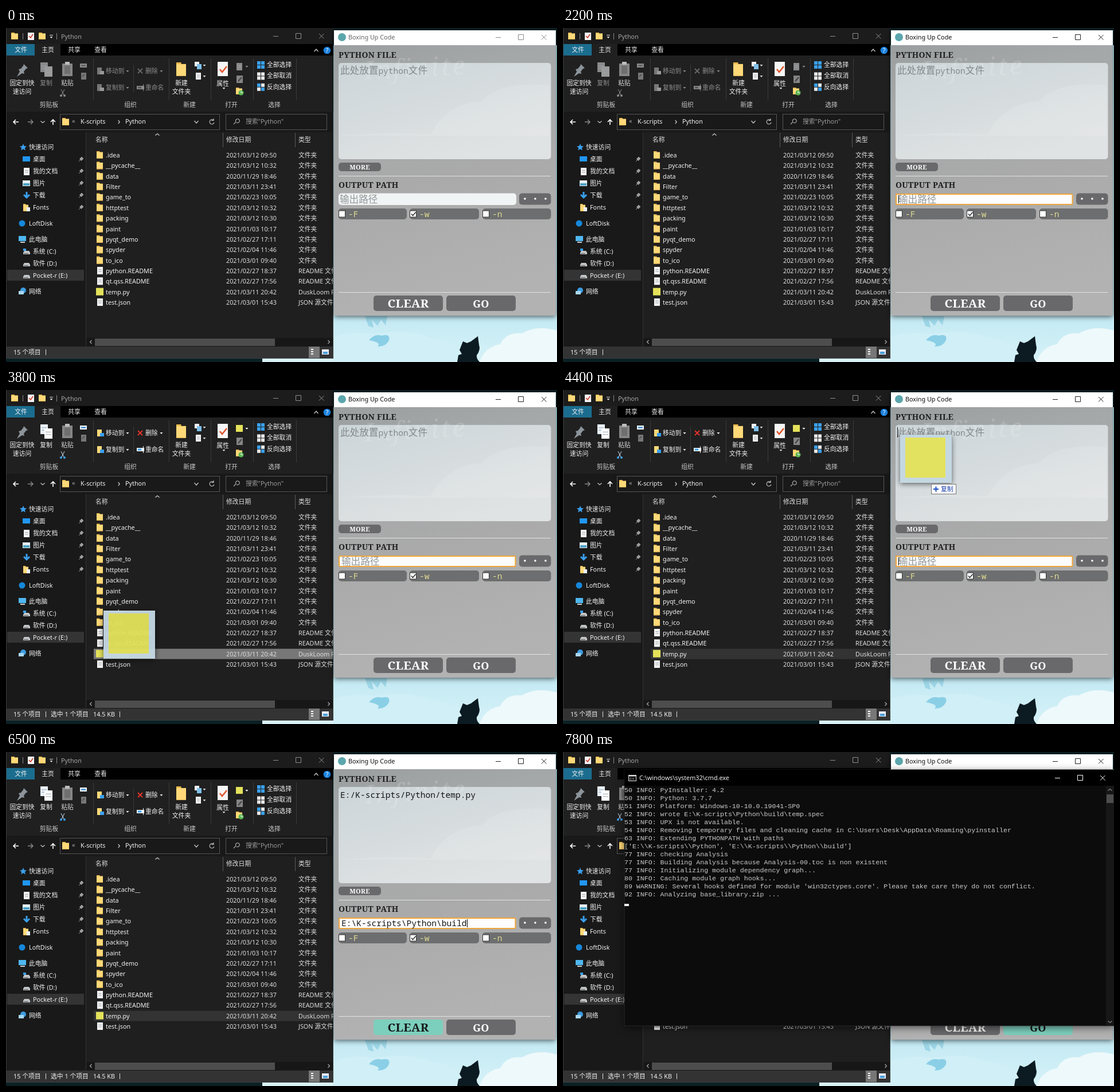
These frames come from a looping animation (961 px wide and 583 px high, 8 s). An HTML page:

```html
<!DOCTYPE html>
<html lang="zh-CN">
<head>
<meta charset="utf-8">
<title>Packager demo</title>
<style>
html, body { margin: 0; height: 100%; overflow: hidden; background: #0b2024; }
svg { display: block; width: 100vw; height: 100vh; }
text { font: 10.8px "Noto Sans", "Noto Sans CJK SC", sans-serif; white-space: pre; }
.mid { text-anchor: middle; }
.mono { font: 14.57px "Noto Sans Mono", "Noto Sans CJK SC", monospace; }
.cjk { font: 300 16.6px "Noto Sans CJK SC", sans-serif; }
.slab { font: 900 14px "Noto Serif", serif; letter-spacing: .3px; }
.term { font: 11.6px "Liberation Mono", monospace; }
.script { font: italic 300 44px "Noto Serif", serif; letter-spacing: 4px; }
.console { filter: drop-shadow(0 3px 7px #0008); }
.window { filter: drop-shadow(0 2px 5px #0009); }
</style>
</head>
<body>
<svg viewBox="0 0 961 583" preserveAspectRatio="none">
  <defs>
    <linearGradient id="sky" x2="0" y2="1"><stop stop-color="#a9dbe6"/><stop offset=".85" stop-color="#c3e9f3"/><stop offset="1" stop-color="#d6f2f8"/></linearGradient>
    <linearGradient id="panel" x2=".2" y2="1"><stop stop-color="#989c9d"/><stop offset=".25" stop-color="#a5a8a9"/><stop offset=".6" stop-color="#aaa"/><stop offset="1" stop-color="#b2b2b2"/></linearGradient>
    <linearGradient id="box" x2=".6" y2="1"><stop stop-color="#ccd5d8"/><stop offset="1" stop-color="#e0e3e4"/></linearGradient>
  </defs>
  <g id="scene"></g>
</svg>
<script>
const LOOP = 8000, STEP = 100;
const TEAL = '#7dcfbd', GREY = '#69696b', DIM = '#8c8c8c', BLUE = '#3aa0ee', LOGO = '#e4e25a';

const rect = (x, y, w, h, fill, more = '') =>
  `<rect x="${x}" y="${y}" width="${w}" height="${h}" fill="${fill}" ${more}/>`;
const round = (x, y, w, h, fill) => rect(x, y, w, h, fill, 'rx="5"');
const dot = (x, y, r, fill) => `<circle cx="${x}" cy="${y}" r="${r}" fill="${fill}"/>`;
const path = (d, stroke = '#ccc', width = 1, fill = 'none') =>
  `<path d="${d}" stroke="${stroke}" stroke-width="${width}" fill="${fill}"/>`;
const shape = (d, fill) => path(d, 'none', 0, fill);
const text = (x, y, s, fill = '#fff', cls = '', size = 0) =>
  `<text x="${x}" y="${y}" fill="${fill}" class="${cls}"${size ? ` style="font-size:${size}px"` : ''}>${s}</text>`;
const label = (x, y, s, fill = '#f2f2f2', cls = '') => text(x, y + 4, s, fill, cls);
const mid = (x, y, s, fill) => label(x, y, s, fill, 'mid');

const folder = (x, y, w = 11, h = 13) =>
  rect(x, y, w * .5, h, '#e8b64a') + rect(x, y + h * .12, w, h * .88, '#ffd978') + rect(x, y + h - 1, w, 1, '#e0b050');
const sheet = (x, y, w, h, fill = '#f4f4f4') =>
  rect(x, y, w, h, fill) + path(`M${x + 2} ${y + h * .35}h${w - 4}M${x + 2} ${y + h * .6}h${w - 4}`, '#9aa4ad');
const drop = (x, y, fill = '#ddd') => shape(`M${x - 2.5} ${y - 1}h5l-2.5 3z`, fill);
const chevron = (x, y, dx, dy, stroke = '#ccc') => dx
  ? path(`M${x - dx} ${y - 3}l${2 * dx} 3l${-2 * dx} 3`, stroke, 1.2)
  : path(`M${x - 3.5} ${y - dy}l3.5 ${2 * dy}l3.5 ${-2 * dy}`, stroke, 1.2);
const captionButtons = (xs, y, stroke) =>
  path(`M${xs[0] - 4} ${y + .5}h9M${xs[1] - 4.5} ${y - 4.5}h9v9h-9zM${xs[2] - 4} ${y - 4}l8.5 8.5m0 -8.5l-8.5 8.5`, stroke);

function wallpaper() {
  return rect(571, 30, 390, 553, 'url(#sky)') + rect(447, 576, 124, 7, '#d9f2f7') +
    shape('M571 583V540Q600 528 640 534Q700 524 740 540Q775 545 790 560V583z', '#d0eff7') +
    shape('M826 583Q835 556 862 552Q872 530 900 533Q925 518 961 528V583z', '#eef9fb') +
    shape('M626 503l6 17 9 3-3-14 10 11 6-11 8 10 3-16z', '#9dd6e6') +
    shape('M633 545q10-12 22-8q16-4 13 8q-6 12-20 11q8-7-15-11z', '#8acfe6') +
    shape('M787 583l2-12 6-2-4-7 6-15 7 3 7-3 12-9 2 15q3 9-4 18q-1 6 5 12z', '#0c1a22');
}

function ribbon(on) {
  const live = on ? '#f2f2f2' : DIM, paper = on ? '#eaf2fb' : '#8a8a8a';
  let s = rect(1, 0, 570, 28, '#1c1c1c') + rect(1, 28, 570, 20, '#000') + rect(1, 48, 570, 98, '#202020') +
    rect(1, 28, 49, 20, '#1b6d8f') + rect(50, 28, 45, 20, '#202020');
  s += folder(9, 8, 12, 12) + path('M29.5 9v11M88.5 9v11', '#888') + rect(38, 8, 11, 13, '#f4f4f4') +
    path('M40 14l3 3 4-6', '#d23b2a', 1.6) + folder(57, 8, 12, 12) + path('M76 12.5h6', '#ddd') + drop(79, 16) +
    label(96, 15, 'Python', '#a5a5a5') + captionButtons([470, 510, 550], 14, '#8f8f8f');
  s += mid(26, 38, '文件') + mid(73, 38, '主页') + mid(119, 38, '共享') + mid(165, 38, '查看') +
    chevron(541, 39, 0, -2) + dot(560, 39, 6.3, '#1c83e0') + mid(560, 39, '?', '#fff');
  for (const x of [152, 284, 357, 431, 506]) s += rect(x, 53, 1, 73, '#3a3a3a');
  s += rect(222, 64, 1, 48, '#3a3a3a');

  s += shape('M31 63l7 7-3 1-4 5 1 4-4-1-9 6 5-9-2-4 4-1 4-5z', '#8d959b') +
    mid(28, 96, '固定到快') + mid(28, 111, '速访问') +
    sheet(60, 60, 13, 17, paper) + sheet(67, 67, 14, 18, on ? '#fff' : '#9a9a9a') + mid(70, 96, '复制', live) +
    rect(98, 62, 18, 22, '#858585') + rect(103, 59, 8, 5, '#bdbdbd') + rect(102, 66, 10, 14, '#6f6f6f') + mid(107, 96, '粘贴', '#d0d0d0') +
    rect(129, 62, 12, 7, paper) + path('M131 65.5h8', on ? '#2476c8' : '#555', 2) + rect(131, 78, 9, 12, '#777') + path('M133 85l4-4', '#222') +
    path('M96 107l5 10m1-10l-5 10', on ? '#cde' : DIM) + dot(96, 118, 2, on ? BLUE : DIM) + dot(102, 118, 2, on ? BLUE : DIM);

  for (const [y, name] of [[75, '移动到'], [104, '复制到']])
    s += rect(159, y - 6, 8, 12, on ? '#ffd978' : '#777') + rect(164, y, 7, 6, on ? BLUE : '#999') + label(174, y, name, live) + drop(212, y, live);
  s += path('M230 71l8 8m0-8l-8 8', on ? '#e3342b' : '#666', 2) + label(243, 75, '删除', live) + drop(271, 75, live) +
    rect(228, 101, 13, 6, paper) + rect(230, 102.5, 6, 3, on ? BLUE : '#555') + path('M239.5 98v12', live) + label(243, 104, '重命名', live);

  s += folder(297, 60, 17, 24) + mid(306, 96, '新建') + mid(306, 111, '文件夹') +
    rect(329, 59, 8, 8, '#f4f4f4') + rect(333, 63, 8, 9, '#7fc0ea') + drop(346, 65) + sheet(331, 78, 9, 12) + drop(346, 84) +
    rect(369, 59, 18, 25, '#f6f6f6') + path('M373 72l4 5 8-10', '#e2552c', 2.6) + mid(378, 97, '属性') + drop(380, 105);
  s += on ? rect(401, 61, 12, 12, LOGO) : sheet(402, 61, 10, 13, '#8a8a8a');
  s += drop(420, 67, live) + rect(402, 83, 11, 13, '#858585') + path('M405 93l6-7', '#444', 2) +
    folder(401, 104, 11, 12) + dot(410, 113, 4.5, '#5ab552') + path('M410 110v3h3', '#fff');
  ['全部选择', '全部取消', '反向选择'].forEach((name, i) => {
    const y = 64 + i * 19.4, tint = [BLUE, '#e8e8e8', BLUE];
    for (const [j, dx, dy] of [[0, 0, 0], [1, 7, 0], [1, 0, 7], [0, 7, 7]])
      s += rect(438 + dx, y - 6 + dy, 6, 6, i == 2 && j ? '#e8e8e8' : tint[i]);
    s += label(455, y, name);
  });
  [[75, '剪贴板'], [217, '组织'], [320, '新建'], [393, '打开'], [468, '选择']].forEach(([x, name]) => s += mid(x, 134, name, '#c8c8c8'));
  return s;
}

function sidebar() {
  let s = shape('M30 202l1.7 4 4.3.4-3.2 2.8 1 4.3-3.8-2.3-3.8 2.3 1-4.3-3.2-2.8 4.3-.4z', BLUE) + label(40, 208, '快速访问');
  ['桌面', '我的文档', '图片', '下载', 'Fonts'].forEach((name, i) => {
    const y = 229 + i * 21;
    s += label(47, y, name) + path(`M127 ${y + 4}l3-3m-2-2l4 4m-3-4l3-3 3 3-3 3z`, '#9a9a9a', 1, '#9a9a9a');
    s += [rect(29, y - 5, 13, 9, '#2196f3'), sheet(31, y - 6, 10, 13), rect(29, y - 5, 13, 10, '#e6eef2') + rect(30, y, 11, 4, '#4ba3c7'),
      path(`M36 ${y - 6}v9m-5-4l5 5 5-5`, BLUE, 3), folder(30, y - 6, 9, 13) + rect(36, y, 6, 7, '#e8f0fa')][i];
  });
  s += dot(28, 341, 5.5, '#1688dc') + label(40, 341, 'LoftDisk') +
    rect(22, 363, 13, 9, '#4fb7f0') + rect(25, 373, 8, 2, '#ccc') + label(40, 369, '此电脑') + rect(2, 422, 134, 19, '#343434');
  ['系统 (C:)', '软件 (D:)', 'Pocket-r (E:)'].forEach((name, i) => {
    const y = 390 + i * 21;
    s += shape(`M30 ${y + 5}v-3l2-3h8l2 3v3z`, '#c4c8ca') + rect(31, y + 3, 8, 1, '#555') + (i ? '' : rect(30, y - 5, 5, 4, BLUE)) + label(47, y, name);
  });
  return s + dot(30, 458, 5, '#3c9be0') + rect(22, 459, 9, 6, '#a9d7f2') + label(40, 460, '网络');
}

const FILES = `.idea|03/12 09:50
__pycache__|03/12 10:32
data|11/29 18:46
Filter|03/11 23:41
game_to|02/23 10:05
httptest|03/12 10:32
packing|03/12 10:30
paint|01/03 10:17
pyqt_demo|02/27 17:11
spyder|02/04 11:46
to_ico|03/01 09:40
python.README|02/27 18:37|README 文件
qt.qss.README|02/27 17:56|README 文件
temp.py|03/11 20:42|DuskLoom Py
test.json|03/01 15:43|JSON 源文件`.split('\n').map(line => line.split('|'));

function fileList(row, rowFill) {
  let s = label(156, 195, '名称', '#e0e0e0') + label(384, 195, '修改日期', '#e0e0e0') + label(510, 195, '类型', '#e0e0e0') +
    rect(378, 183, 1, 25, '#5a5a5a') + rect(504, 183, 1, 25, '#5a5a5a') + chevron(264, 186, 0, -1.5);
  FILES.forEach(([name, date, type], i) => {
    const y = 222 + i * 18.36;
    if (i == row) s += rect(153, y - 9, 417, 18, rowFill);
    s += !type ? folder(158, y - 7) : i == 13 ? rect(157, y - 7, 13, 13, LOGO) : sheet(159, y - 7, 10, 13);
    s += label(174, y, name) + label(384, y, (i == 2 ? '2020/' : '2021/') + date, '#dedede') + label(510, y, type || '文件夹', '#dedede');
  });
  return s;
}

function explorer(t) {
  const on = t >= 3700;
  const row = t < 2800 ? -1 : t < 2900 ? 6 : t < 3000 ? 9 : t < 3100 ? 11 : 13;
  let s = rect(0, 0, 571, 577, '#3a3f40') + rect(1, 0, 569, 576, '#191919') + rect(140, 182, 430, 374, '#1f1f1f') +
    rect(139, 182, 1, 374, '#333') + ribbon(on);
  s += path('M22 164h-9m4-4l-4 4 4 4M82 169v-9m-4 4l4-4 4 4', '#fff', 1.6) + path('M38 164h9m-4-4l4 4-4 4', '#8a8a8a', 1.4) + chevron(64, 164, 0, 1.5) +
    rect(94.5, 150.5, 278, 27, 'none', 'stroke="#555"') + folder(98, 157, 12, 13) + label(115, 162, '«', '#aaa') +
    label(130, 163, 'K-scripts') + chevron(197, 164, 1.3, 0) + label(208, 163, 'Python') + chevron(332, 164, 0, 2) +
    path('M362 161a4 4 0 1 0 1 4m-1-7v3.5h-3.5', '#bbb', 1.2) +
    rect(383.5, 150.5, 176, 27, 'none', 'stroke="#555"') + path('M397 168l4-4a3.4 3.4 0 1 1 1 1', '#aaa', 1.2) + label(418, 163, '搜索"Python"', '#9a9a9a');
  s += sidebar() + fileList(row, !on ? '#4b4b4b' : t < 3900 ? '#777' : '#333');
  s += rect(140, 541, 430, 15, '#171717') + rect(155, 542, 314, 13, '#4d4d4d') + chevron(148, 548, -1.5, 0, '#aaa') + chevron(563, 548, 1.5, 0, '#aaa') +
    rect(1, 556, 569, 20, '#333') + label(13, 566, '15 个项目') + rect(69, 561, 1, 10, '#ddd') +
    (on ? label(78, 566, '选中 1 个项目') + label(152, 566, '14.5 KB') + rect(198, 561, 1, 10, '#ddd') : '');
  return s + rect(528, 556, 19, 20, '#777') + path('M532 561h4m-4 4h4m-4 4h4', '#fff', 2) + rect(551, 561, 12, 9, '#eef') + rect(553, 565, 8, 4, '#49a0d8');
}

const CARET_TOGGLES = [1000, 1600, 2000, 2700, 3300, 3800, 4300, 5100, 5600, 6100, 6500, 7100, 7300];

function packer(t) {
  const active = t >= 1000, open = t >= 1100 && t < 2200, focus = active && t < 7300;
  const caret = focus && CARET_TOGGLES.filter(at => at <= t).length % 2;
  const y = open ? 120.5 : 0, ink = active ? '#111' : '#666';
  const moreHover = t >= 800 && t < 1100 || t >= 1500 && t < 2200 || t >= 2700 && t < 2800;
  const clearHover = t >= 6000 && t < 6600, goHover = t >= 6600;
  const heading = (at, s) => text(580, at, s, '#1d1d1f', 'slab');
  const button = (x, s, hover, size) => round(x, 467, 121, 27, hover ? TEAL : GREY) +
    text(x + 60.5, 488, s, hover ? '#161a1a' : '#fff', 'slab mid', size);

  let s = `<g class="window">${rect(572, 4, 387, 498, 'url(#panel)')}</g>` + rect(572, 4, 387, 26, '#fff') +
    dot(586, 16, 7, '#5ba6ac') + label(597, 16, 'Boxing Up Code', ink) + captionButtons([858, 898, 938], 16, active ? '#222' : '#888');
  s += heading(52, 'PYTHON FILE') + round(580, 61, 370.5, open ? 129.5 : 168, 'url(#box)') +
    `<g opacity=".16" transform="rotate(-3 620 90)">${text(626, 90, 'Infinite', '#fff', 'script')}</g>` +
    shape('M583 188Q680 180 740 186Q770 130 830 128Q860 92 948 100V188z', '#ffffff1c');
  s += t < 4700 ? text(583, 80, '此处放置<tspan class="mono">python</tspan>文件', '#81898c', 'cjk')
    : text(583, 80, 'E:/K-scripts/Python/temp.py', '#161616', 'mono');
  if (open) s += heading(210, 'ICON FILE') + round(580, 219.5, 370.5, 130.5, 'url(#box)') + text(583, 238, '此处放置图标文件，非必要', '#81898c', 'cjk');

  const moreInk = moreHover ? '#161a1a' : '#fff';
  s += round(580, 235 + y, 74, 15, moreHover ? TEAL : GREY) +
    (open ? path('M616 369v-12m-3 4l3-4 3 4', moreInk) : text(617, 247, 'MORE', moreInk, 'slab mid', 11));
  s += rect(580, 258 + y, 370, 1, '#e2e2e2') + rect(580, 461, 370, 1, '#e2e2e2') + heading(279 + y, 'OUTPUT PATH');

  s += focus ? rect(581, 290 + y, 307.5, 18, '#fdfdfd', 'rx="2" stroke="#f0a63a" stroke-width="2"') : round(580, 288.5 + y, 310, 20.5, '#f1f4f4');
  const left = focus ? 585 : 582, filled = t >= 4700;
  s += filled ? text(left, 304 + y, 'E:\\K-scripts\\Python\\build', '#161616', 'mono') : text(left, 305 + y, '输出路径', '#92989a', 'cjk');
  if (caret) s += rect(filled ? 804 : 585, 292 + y, 1, 14, '#000');
  s += round(895, 288.5 + y, 55.5, 20, GREY);
  for (const x of [905, 923, 941]) s += dot(x, 298 + y, 1.8, '#fff');

  [[580, 119, '-F'], [704, 121, '-w'], [831, 119.5, '-n']].forEach(([x, w, name], i) => {
    s += round(x, 315 + y, w, 19, '#6d6e6f') + rect(x + .5, 319 + y, 11, 11, '#fff', 'stroke="#333"') +
      (i == 1 ? path(`M${x + 3} ${324.5 + y}l2.5 3 5-6`, '#222', 1.4) : '') + text(x + 17, 330 + y, name, '#dedb92', 'mono');
  });
  return s + button(641, 'CLEAR', clearHover, 20.5) + button(768, 'GO', goHover, 18);
}

function dragged(t) {
  if (t < 3800 || t >= 4700) return '';
  const p = Math.min(1, (t - 3800) / 600), e = p * p * (3 - 2 * p);
  const x = 170 + 418 * e, y = 385 - 307 * e;
  let s = `<g opacity=".95">${rect(x, y, 90, 84, '#c5d8e3', 'class="window"')}${rect(x + 9, y + 5, 70, 70, LOGO)}</g>`;
  if (x + 46 > 572) s += rect(x + 54.5, y + 86.5, 43, 17, '#fff', 'stroke="#777"') +
    path(`M${x + 58} ${y + 95}h9m-4.5-4.5v9`, '#1d4fc4', 2) + label(x + 71, y + 95, '复制', '#1b3fae');
  if (p == 1) s += rect(583, 65, 1, 18, '#111');
  return s;
}

const LOG = String.raw`50 INFO: PyInstaller: 4.2
50 INFO: Python: 3.7.7
51 INFO: Platform: Windows-10-10.0.19041-SP0
52 INFO: wrote E:\K-scripts\Python\build\temp.spec
53 INFO: UPX is not available.
54 INFO: Removing temporary files and cleaning cache in C:\Users\Desk\AppData\Roaming\pyinstaller
63 INFO: Extending PYTHONPATH with paths
['E:\\K-scripts\\Python', 'E:\\K-scripts\\Python\\build']
77 INFO: checking Analysis
77 INFO: Building Analysis because Analysis-00.toc is non existent
77 INFO: Initializing module dependency graph...
80 INFO: Caching module graph hooks...
89 WARNING: Several hooks defined for module 'win32ctypes.core'. Please take care they do not conflict.
92 INFO: Analyzing base_library.zip ...`.split('\n');

function consoleWindow(t) {
  if (t < 7500) return '';
  const [scale, alpha] = t < 7600 ? [.985, .66] : t < 7700 ? [.996, .92] : [1, 1];
  const lines = t < 7800 ? [] : LOG;
  return `<g class="console" opacity="${alpha}" transform="translate(534 255) scale(${scale}) translate(-534 -255)">` +
    rect(107, 31, 855, 447, '#0c0c0c', 'stroke="#3a3a3a" stroke-width=".6"') + rect(107, 31, 855, 28, '#000') +
    rect(114.5, 40.5, 13, 10, '#111', 'stroke="#ddd"') + rect(114, 40, 14, 2.5, '#ddd') + text(116, 49, 'C:\\', '#fff', '', 6) +
    label(133, 45, 'C:\\windows\\system32\\cmd.exe') + captionButtons([862, 902, 941], 45, '#fff') +
    rect(947, 59, 14, 419, '#171717') + rect(948, 74, 12, 15, '#4d4d4d') + chevron(954, 66, 0, -1.5, '#888') + chevron(954, 471, 0, 1.5, '#888') +
    lines.map((line, i) => text(107, 70 + i * 14, line, '#ccc', 'term')).join('') +
    rect(107, lines.length ? 265 : 69, 8, 4, '#eee') + '</g>';
}

const scene = document.getElementById('scene');
let shown = -1;
function tick() {
  const t = Math.floor(performance.now() % LOOP / STEP) * STEP;
  if (t !== shown) {
    shown = t;
    scene.innerHTML = wallpaper() + explorer(t) + packer(t) + dragged(t) + consoleWindow(t);
  }
  requestAnimationFrame(tick);
}
tick();
</script>
</body>
</html>
```
